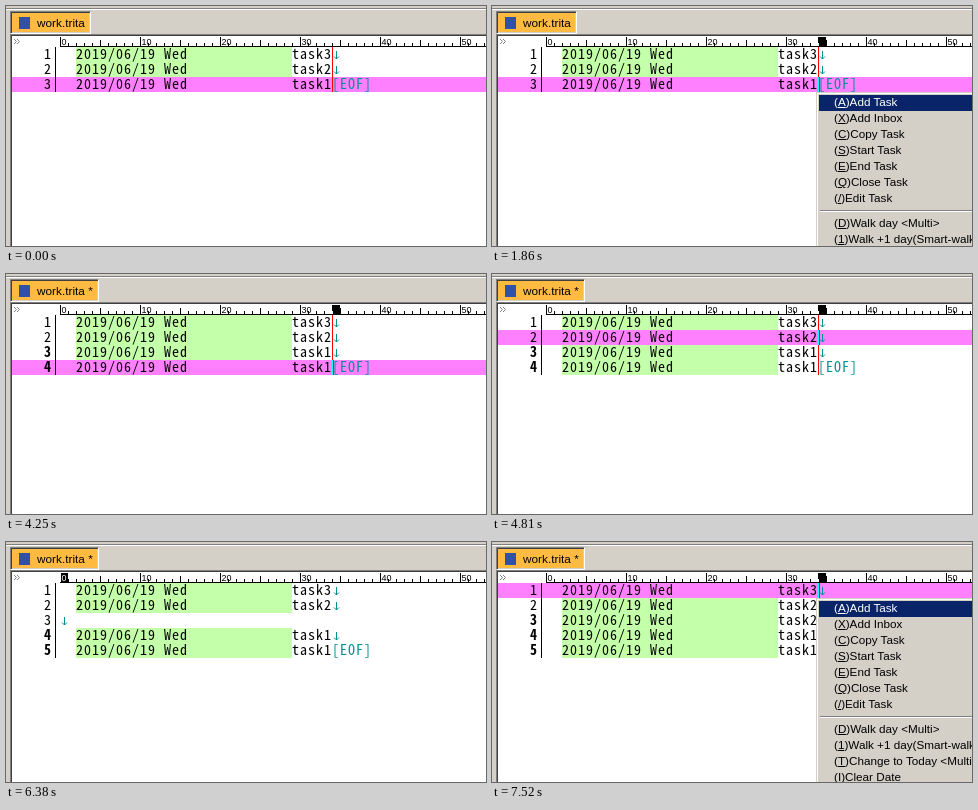
An HTML page that plays this animation: 480 by 240 pixels, repeating every 8 s.

```html
<!DOCTYPE html>
<html lang="en">
<head>
<meta charset="utf-8">
<title>Task editor</title>
<style>
  html, body { margin: 0; width: 100%; height: 100%; overflow: hidden; }
  #stage { position: relative; width: 480px; height: 240px; overflow: hidden; background: #d4d0c8; }
  #stage div, #stage svg, #stage span { position: absolute; white-space: pre; }
  #rule { left: 0; top: 2px; width: 480px; height: 1px; background: #808080; border-bottom: 1px solid #fff; }
  #tab { left: 4px; top: 5px; height: 21px; padding: 0 5px 0 26px; border: 1px solid; border-color: #808080 #fff #fff #808080;
    background: #ffba42; box-shadow: inset 1px 1px #404040, inset -1px -1px #d4d0c8;
    font: 11.8px/22px "Liberation Sans", Arial, sans-serif; }
  #icon { left: 8px; top: 5px; width: 11px; height: 12px; background: #3350a8; }
  #title { font-weight: normal; }
  #pane { left: 4px; top: 28px; width: 476px; height: 212px; border: solid #808080; border-width: 1px 0 0 1px; box-sizing: border-box; }
  #paper { left: 0; top: 0; width: 476px; height: 212px; border: solid #404040; border-width: 1px 0 0 1px; background: #fff; }
  #ruler { left: 0; top: 0; font: 9px "Liberation Sans", Arial, sans-serif; }
  #mark { top: 31px; width: 8px; height: 9px; background: #fff; mix-blend-mode: difference; }
  .row { left: 6px; width: 474px; height: 15px; font: 300 14px/15px "Noto Sans Mono CJK JP", "Noto Sans CJK JP", monospace; letter-spacing: 1px; }
  .row span { top: -1px; }
  .row .num { left: 32px; }
  .row.dirty .num { font-weight: bold; }
  .row .gutter { left: 43px; width: 1px; height: 15px; background: #000; }
  .row .date { left: 64px; width: 216px; height: 15px; background: #c4ffaa; }
  .row .name { left: 280px; }
  .row .end { color: #009090; }
  .row.current, .row.current .date { background: #ff80ff; }
  #line { left: 326px; top: 41px; width: 1px; background: #f00; }
  #caret { left: 326px; width: 2px; height: 15px; background: linear-gradient(90deg, #0ff 50%, #007f00 50%); }
  #menu { left: 324px; width: 200px; height: 240px; background: #d4d0c8; font: 11.7px/14px "Liberation Sans", Arial, sans-serif; }
  #menu .edge { left: 1px; top: 1px; width: 200px; height: 240px; border: solid #fff; border-width: 1px 0 0 1px; }
  #menu .item { left: 3px; width: 182px; height: 16px; padding-left: 15px; }
  #menu .on { background: #0a246a; color: #fff; }
  #menu .sep { left: 4px; top: 118px; width: 196px; height: 1px; background: #808080; border-bottom: 1px solid #fff; }
</style>
</head>
<body>
<div id="stage">
  <div id="rule"></div>
  <div id="tab"><div id="icon"></div><b id="title"></b></div>
  <div id="pane"><div id="paper"></div></div>
  <svg id="ruler" width="480" height="42"></svg>
  <div id="mark"></div>
  <div id="rows"></div>
  <div id="line"></div>
  <div id="caret"></div>
  <div id="menu"></div>
</div>
<script>
const $ = id => document.getElementById(id);
const LOOP = 8000, LEFT = 54, TOP = 41, CELL = 8, ROW = 15;
const DATE = "2019/06/19 Wed";
const ITEMS = ["AAdd Task", "XAdd Inbox", "CCopy Task", "SStart Task", "EEnd Task", "QClose Task", "/Edit Task",
  "DWalk day <Multi>", "1Walk +1 day(Smart-walk)", "TChange to Today <Multi>", "IClear Date"];

// Task numbers per line (0 = blank line) and the range of modified lines
const before = { tasks: [3, 2, 1], dirty: [9, 9] };
const copied = { tasks: [3, 2, 1, 1], dirty: [3, 4] };
const opened = { tasks: [3, 2, 0, 1, 1], dirty: [4, 5] };
const pasted = { tasks: [3, 2, 2, 1, 1], dirty: [3, 5] };

// start time, document, cursor line, caret shown, selected menu item (-1 = closed), ruler mark column
const steps = [
  [0, before, 3, 0, -1, -1],
  [720, before, 3, 1, -1, 34],
  [1300, before, 3, 0, -1, 34],
  [1730, before, 3, 1, -1, 34],
  [1860, before, 3, 1, 0, 34],
  [2290, before, 3, 1, 1, 34],
  [2570, before, 3, 1, 2, 34],
  [4250, copied, 4, 1, -1, 34],
  [4660, copied, 3, 1, -1, 34],
  [4810, copied, 2, 1, -1, 34],
  [5110, copied, 2, 1, 0, 34],
  [5670, copied, 2, 1, 1, 34],
  [5800, copied, 2, 1, 2, 34],
  [6380, opened, 0, 0, -1, 0],
  [6500, pasted, 3, 1, -1, 34],
  [6970, pasted, 3, 0, -1, 34],
  [7110, pasted, 2, 1, -1, 34],
  [7240, pasted, 1, 1, -1, 34],
  [7520, pasted, 1, 1, 0, 34]
];

const escapeHTML = s => s.replace(/</g, "&lt;");
const show = (el, on) => { el.style.display = on ? "block" : "none"; };

function drawRuler() {
  let ticks = `M${LEFT} 40.5H480`, labels = "";
  for (let c = 0, x = LEFT; x < 480; c++, x += CELL) {
    ticks += `M${x + .5} ${c % 10 ? c % 5 ? 37 : 34 : 31}V41`;
    if (c % 10 === 0) labels += `<text x="${x + 1.5}" y="39">${c}</text>`;
  }
  $("ruler").innerHTML = `<path d="${ticks}" stroke="#000"/>${labels}
    <path d="M8 33l2.5 2.5L8 38M11 33l2.5 2.5L11 38" fill="none" stroke="#808080"/>`;
}

function rowHTML(task, i, doc, cursor) {
  const n = i + 1, last = n === doc.tasks.length;
  const cls = (n === cursor ? " current" : "") + (n >= doc.dirty[0] && n <= doc.dirty[1] ? " dirty" : "");
  const endX = task ? 320 : 48;
  const end = last ? `<span class="end" style="left:${endX}px">[EOF]</span>`
    : `<svg style="left:${endX}px;top:0" width="8" height="15"><path d="M4.5 4V12M2 9.5l2.5 2.5L7 9.5" fill="none" stroke="#009090"/></svg>`;
  const body = task ? `<div class="date"><span>${DATE}</span></div><span class="name">task${task}</span>` : "";
  return `<div class="row${cls}" style="top:${TOP + i * ROW}px"><span class="num">${n}</span><div class="gutter"></div>${body}${end}</div>`;
}

function menuHTML(selected) {
  const items = ITEMS.map((s, i) => {
    const y = 3 + i * 16 + (i > 6 ? 9 : 0);
    return `<div class="item${i === selected ? " on" : ""}" style="top:${y}px">(<u>${s[0]}</u>)${escapeHTML(s.slice(1))}</div>`;
  });
  return `<div class="edge"></div>${items.join("")}<div class="sep"></div>`;
}

function render([, doc, cursor, caret, selected, mark]) {
  $("title").textContent = doc === before ? "work.trita" : "work.trita *";
  $("rows").innerHTML = doc.tasks.map((t, i) => rowHTML(t, i, doc, cursor)).join("");
  $("line").style.height = doc.tasks.length * ROW + "px";
  show($("line"), cursor);
  $("caret").style.top = TOP + (cursor - 1) * ROW + "px";
  show($("caret"), caret);
  $("mark").style.left = LEFT + mark * CELL + "px";
  show($("mark"), mark >= 0);
  $("menu").style.top = TOP + cursor * ROW + "px";
  $("menu").innerHTML = menuHTML(selected);
  show($("menu"), selected >= 0);
}

let shown;
const start = performance.now();
function tick() {
  const t = (performance.now() - start) % LOOP;
  const step = steps.filter(s => s[0] <= t).pop();
  if (step !== shown) render(shown = step);
  requestAnimationFrame(tick);
}
drawRuler();
tick();
</script>
</body>
</html>
```
